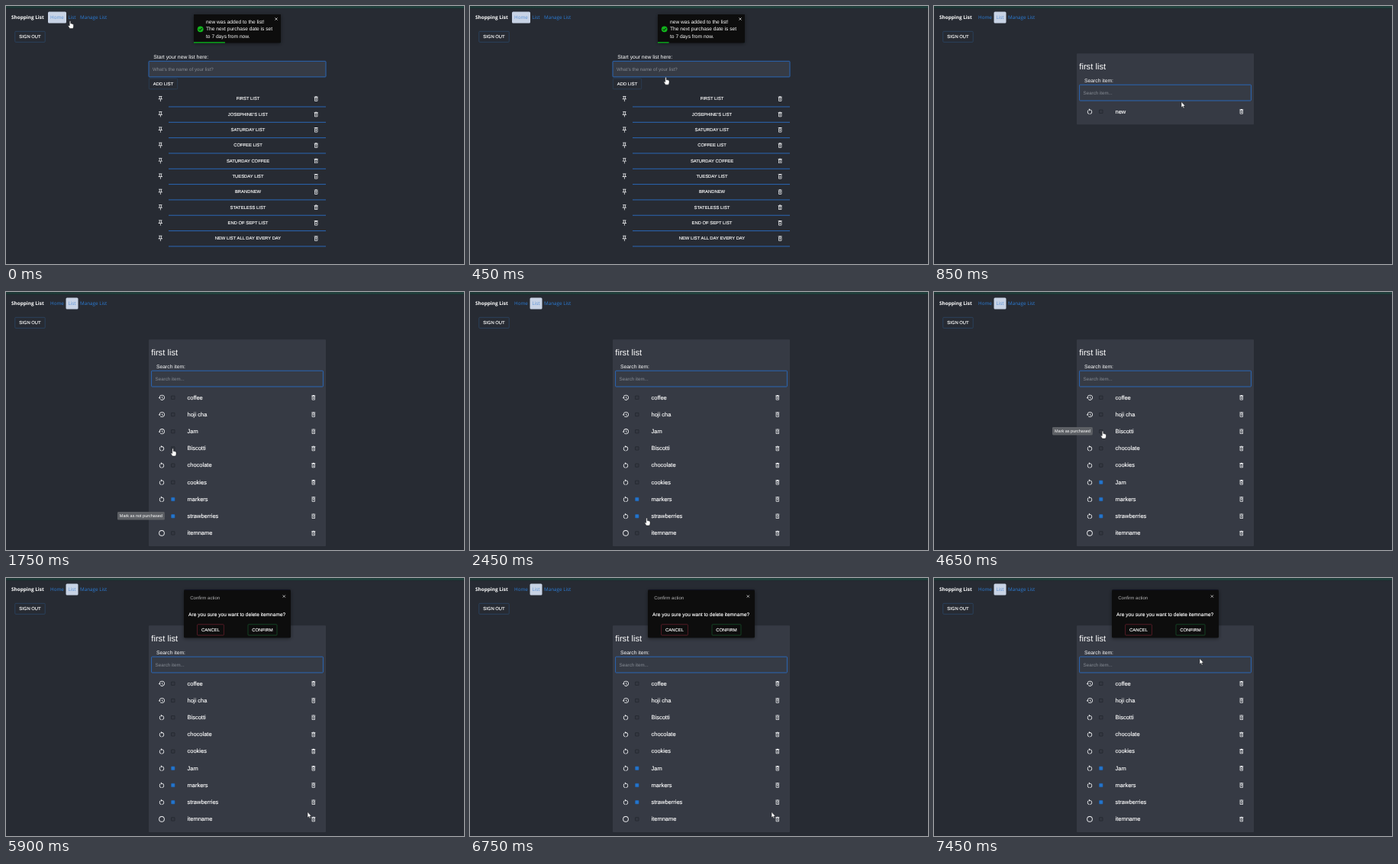
An HTML page that plays this animation: 600x338 px, repeating every 7500 ms.

```html
<!DOCTYPE html>
<html lang="en">
<head>
<meta charset="utf-8">
<title>Shopping List</title>
<style>
  html, body { margin: 0; width: 100%; height: 100%; overflow: hidden; background: #272b33; }
  svg { display: block; width: 100vw; height: 100vh; }
  text { font-family: "Liberation Sans", Arial, sans-serif; fill: #fff; text-rendering: geometricPrecision; white-space: pre; }
  .nav { font-family: "Open Sans", "Noto Sans", sans-serif; }
  .strong { stroke: #fff; stroke-width: .14px; }
</style>
</head>
<body>
<svg id="stage" viewBox="0 0 600 338">
  <defs>
    <linearGradient id="strip" x2="1" y2="0">
      <stop offset="0" stop-color="#1d3735"/><stop offset=".5" stop-color="#23443f"/><stop offset="1" stop-color="#1f3d3a"/>
    </linearGradient>
    <filter id="shadow" x="-20%" y="-30%" width="140%" height="170%">
      <feDropShadow dx="0" dy="1" stdDeviation="2.5" flood-color="#000" flood-opacity=".45"/>
    </filter>
  </defs>
</svg>
<script>
const LOOP = 7500;
const BLUE = '#2a66b4';
const stage = document.getElementById('stage');

const ICONS = {
  pin: 'M14 4v5c0 1.1.4 2.2 1 3H9c.7-.9 1-1.9 1-3V4h4m3-2H7c-1.3 0-1.3 2 0 2h1v5c0 1.7-1.3 3-3 3v2h6v7l1 1 1-1v-7h6v-2c-1.7 0-3-1.3-3-3V4h1c1.3 0 1.3-2 0-2z',
  trash: 'M6 19c0 1.1.9 2 2 2h8c1.1 0 2-.9 2-2V7H6zM8 9h8v10H8zM15.5 4l-1-1h-5l-1 1H5v2h14V4zM10.5 11.5h3v5h-3z',
  history: 'M13 3c-5 0-9 4-9 9H1l3.9 3.9.1.1L9 12H6c0-3.9 3.1-7 7-7s7 3.1 7 7-3.1 7-7 7c-1.9 0-3.7-.8-4.9-2.1l-1.5 1.5C8.3 20 10.5 21 13 21c5 0 9-4 9-9s-4-9-9-9zm-1 5v5l4.3 2.5.7-1.2-3.5-2.1V8z',
  restart: 'M12 5V2L8 6l4 4V7c3.3 0 6 2.7 6 6 0 3-2.2 5.4-5 5.9v2c4-.5 7-3.8 7-7.9 0-4.4-3.6-8-8-8zM6 13c0-1.7.7-3.2 1.8-4.2L6.3 7.3C4.9 8.8 4 10.8 4 13c0 4.1 3 7.4 7 7.9v-2c-2.8-.5-5-2.9-5-5.9z',
  circle: 'M12 2a10 10 0 1 0 0 20a10 10 0 1 0 0-20zm0 2.4a7.6 7.6 0 1 1 0 15.2a7.6 7.6 0 1 1 0-15.2z'
};

function add(parent, tag, attrs = {}, content) {
  const node = document.createElementNS('http://www.w3.org/2000/svg', tag);
  for (const k in attrs) node.setAttribute(k, attrs[k]);
  if (content !== undefined) node.textContent = content;
  parent.append(node);
  return node;
}
const group = (parent, attrs) => add(parent, 'g', attrs);
const rect = (p, x, y, width, height, fill, extra) => add(p, 'rect', { x, y, width, height, fill, ...extra });
const text = (p, x, y, size, str, extra) =>
  add(p, 'text', { x, y: y + size * .35, 'font-size': size, ...extra }, str);
const icon = (p, name, x, y, scale = .39) =>
  add(p, 'path', { d: ICONS[name], fill: '#f4f5f7', 'fill-rule': 'evenodd',
    transform: `translate(${x} ${y}) scale(${scale}) translate(-12 -12)` });
const mid = { 'text-anchor': 'middle' };

function button(p, x, y, w, h, label, border) {
  rect(p, x, y, w, h, 'none', { stroke: border, 'stroke-width': .8, rx: 1 });
  text(p, x + w / 2, y + h / 2, 5.9, label, { ...mid, class: 'strong' });
}
function field(p, x, y, w, h, hint) {
  rect(p, x, y, w, h, '#363b45', { stroke: BLUE, rx: .8 });
  text(p, x + 5, y + h / 2, 6.2, hint, { style: 'fill:#858a93' });
}
const show = (node, on) => node.setAttribute('visibility', on ? 'visible' : 'hidden');

// Header
rect(stage, 0, 0, 600, 338, '#272b33');
rect(stage, 0, 0, 600, 3.2, 'url(#strip)');
rect(stage, 0, 3.2, 600, .8, '#20282e');
const mark = rect(stage, 55, 7.5, 24, 15, '#c8d3e5', { rx: 1.5 });
text(stage, 7, 15, 6.4, 'Shopping List', { class: 'nav', 'font-weight': 700 });
const links = [[58, 'Home'], [81.5, 'List'], [97, 'Manage List']].map(([x, label]) =>
  text(stage, x, 15, 6.3, label, { class: 'nav' }));
button(stage, 11.8, 33.3, 39.4, 14, 'SIGN OUT', '#2b4768');

// Home page
const home = group(stage);
text(home, 193.3, 66.5, 6.85, 'Start your new list here:');
field(home, 187, 72.3, 232, 20.6, 'What\u2019s the name of your list?');
button(home, 187.3, 95, 37.4, 13.8, 'ADD LIST', '#2b4059');
['FIRST LIST', 'JOSEPHINE\u2019S LIST', 'SATURDAY LIST', 'COFFEE LIST', 'SATURDAY COFFEE', 'TUESDAY LIST',
  'BRANDNEW', 'STATELESS LIST', 'END OF SEPT LIST', 'NEW LIST ALL DAY EVERY DAY'].forEach((name, i) => {
  const y = 121.3 + 20.32 * i;
  icon(home, 'pin', 202.3, y + .3, .37);
  text(home, 317, y, 5.85, name, { ...mid, class: 'strong' });
  icon(home, 'trash', 406.2, y + .3, .36);
  rect(home, 213, y + 10.2, 206, 1, BLUE);
});

// List pages
function listPage(height, rows) {
  const g = group(stage);
  rect(g, 187, 62.3, 232, height, '#363a44', { rx: .8 });
  text(g, 190.3, 79, 11.2, 'first list');
  text(g, 197, 98, 6.75, 'Search item:');
  field(g, 190.6, 103.2, 224.8, 20.8, 'Search item...');
  const boxes = {};
  rows.forEach(([kind, name, done], i) => {
    const y = 138 + 22.2 * i;
    icon(g, kind, 204, y + .3, kind === 'circle' ? .38 : .4);
    boxes[name] = rect(g, 216.6, y - 1.9, 4.4, 4.4, '#343841', { 'stroke-width': .7, rx: .4 });
    tick(boxes[name], done);
    text(g, 237.5, y, 7.5, name, { class: 'strong' });
    icon(g, 'trash', 402.8, y + .3, .36);
  });
  return { g, boxes };
}
function tick(box, on) {
  box.setAttribute('fill', on ? '#2476cc' : '#343841');
  box.setAttribute('stroke', on ? '#1f64b4' : '#22262d');
}
const jam = ['history', 'Jam'];
const head = [['history', 'coffee'], ['history', 'hoji cha']];
const due = [['restart', 'Biscotti'], ['restart', 'chocolate'], ['restart', 'cookies']];
const tail = [['restart', 'markers', true], ['restart', 'strawberries', true], ['circle', 'itemname']];
const loading = listPage(93, [['restart', 'new']]);
const before = listPage(270.7, [...head, jam, ...due, ...tail]);
const after = listPage(270.7, [...head, ...due, ['restart', 'Jam', true], ...tail]);

// Tooltip
const tip = group(stage);
const tipBox = rect(tip, 0, -5.3, 0, 10.6, '#5d6065', { rx: 1.4 });
const tipText = text(tip, 204.8, 0, 5.5, '', { 'text-anchor': 'end' });
const TIPS = [
  [1500, 1800, 'Mark as not purchased', 293.3],
  [1880, 2150, 'Mark as purchased', 204.6],
  [2880, 2980, 'Mark as purchased', 182.2],
  [2980, 3450, 'Mark as not purchased', 182.2],
  [3450, 4760, 'Mark as purchased', 182.2]
];

// Toast
const toast = group(stage);
rect(toast, 246, 11, 114, 37.3, '#080909', { rx: 1.2, filter: 'url(#shadow)' });
['new was added to the list!', 'The next purchase date is set', 'to 7 days from now.'].forEach((s, i) =>
  text(toast, 262, 20.8 + 9.2 * i, 6.65, s));
add(toast, 'circle', { cx: 254.7, cy: 30.3, r: 3.9, fill: '#12b31c' });
add(toast, 'path', { d: 'M252.7 30.4l1.5 1.5 2.6-3', fill: 'none', stroke: '#080909', 'stroke-width': 1 });
const cross = (p, x, y) =>
  add(p, 'path', { d: `M${x - 1.6} ${y - 1.6}l3.2 3.2m0 -3.2l-3.2 3.2`, stroke: '#d5d5d5', 'stroke-width': .8 });
cross(toast, 354, 17);
const bar = rect(toast, 246, 47, 41, 1.6, '#0c9c1c');

// Dialog
const dialog = group(stage);
rect(dialog, 233, 15.5, 140, 62.7, '#0d0d0e', { rx: 1.2, filter: 'url(#shadow)' });
text(dialog, 241.2, 25.8, 6.05, 'Confirm action', { style: 'fill:#b4b4b5' });
cross(dialog, 364.3, 24);
text(dialog, 302.7, 47.6, 6.6, 'Are you sure you want to delete itemname?', { ...mid, class: 'strong' });
button(dialog, 250.6, 60.8, 34.8, 14.2, 'CANCEL', '#65202b');
button(dialog, 317, 60.8, 38, 14.2, 'CONFIRM', '#17502a');

// Pointers, both with the tip at 0,0
const outline = { fill: '#fff', stroke: '#15171b', 'stroke-width': .5, 'stroke-linejoin': 'round' };
const arrow = add(stage, 'path', { ...outline, d: 'M0 0V7.4L1.7 5.9L2.9 8.6L4.1 8.1L2.9 5.5H5.2Z' });
const hand = add(stage, 'path', { ...outline,
  d: 'M-.8 .7Q0 -.5 .8 .7V3.6Q1.7 3 2.2 3.9Q3.2 3.4 3.5 4.3Q4.5 4.1 4.5 5.2V7.4Q4.3 9 3.4 10H-.5Q-1.3 8.4 -2.6 6.7Q-2.7 5.3 -.8 6.4Z' });

// time, x, y, 1 for the hand
const PATH = [
  [0, 84, 19.5, 1], [150, 78, 21, 1], [600, 318, 118, 1], [780, 320, 120, 1], [850, 324, 125.5, 0],
  [1000, 322, 150, 0], [1480, 219, 290, 1], [1600, 219, 290, 1], [1750, 218.5, 205, 1],
  [2100, 219, 203, 1], [2420, 231.5, 296, 1], [2520, 231.5, 296, 1], [2850, 221, 182, 1],
  [4650, 221, 182, 1], [5280, 402, 312, 1], [5700, 402, 312, 1], [5880, 395, 306.5, 0],
  [7060, 395, 306.5, 0], [7450, 348, 105.5, 0], [7500, 348, 105.5, 0]
];
const clamp = v => Math.max(0, Math.min(1, v));
const ease = v => v * v * (3 - 2 * v);

function movePointer(t) {
  let i = 0;
  while (i < PATH.length - 2 && PATH[i + 1][0] <= t) i++;
  const [t0, x0, y0, isHand] = PATH[i], [t1, x1, y1] = PATH[i + 1];
  const k = ease(clamp((t - t0) / (t1 - t0)));
  const node = isHand ? hand : arrow;
  show(hand, isHand);
  show(arrow, !isHand);
  node.setAttribute('transform', `translate(${x0 + (x1 - x0) * k} ${y0 + (y1 - y0) * k})`);
}

function draw(t) {
  const onHome = t < 850;
  show(home, onHome);
  show(loading.g, !onHome && t < 1050);
  show(before.g, t >= 1050 && t < 3450);
  show(after.g, t >= 3450);
  tick(before.boxes.Jam, t >= 2950);

  mark.setAttribute('x', onHome ? 55 : 78.5);
  mark.setAttribute('width', onHome ? 24 : 16);
  links.forEach((l, i) => l.style.fill = i === (onHome ? 0 : 1) ? '#5b93d8' : '#2b7cd6');

  show(toast, t < 800);
  toast.setAttribute('opacity', 1 - clamp((t - 700) / 100));
  bar.setAttribute('width', 41 * (1 - clamp(t / 700)));

  const now = TIPS.find(([from, to]) => t >= from && t < to);
  show(tip, now);
  if (now) {
    const left = now[2].includes('not') ? 146 : 155;
    tipText.textContent = now[2];
    tipBox.setAttribute('x', left);
    tipBox.setAttribute('width', 207.8 - left);
    tip.setAttribute('transform', `translate(0 ${now[3]})`);
  }

  const k = ease(clamp((t - 5500) / 200));
  show(dialog, k > 0);
  dialog.setAttribute('opacity', k);
  dialog.setAttribute('transform', `translate(0 ${-7 * (1 - k)})`);

  movePointer(t);
}

const start = performance.now();
function tickFrame() {
  draw((performance.now() - start) % LOOP);
  requestAnimationFrame(tickFrame);
}
tickFrame();
</script>
</body>
</html>
```
